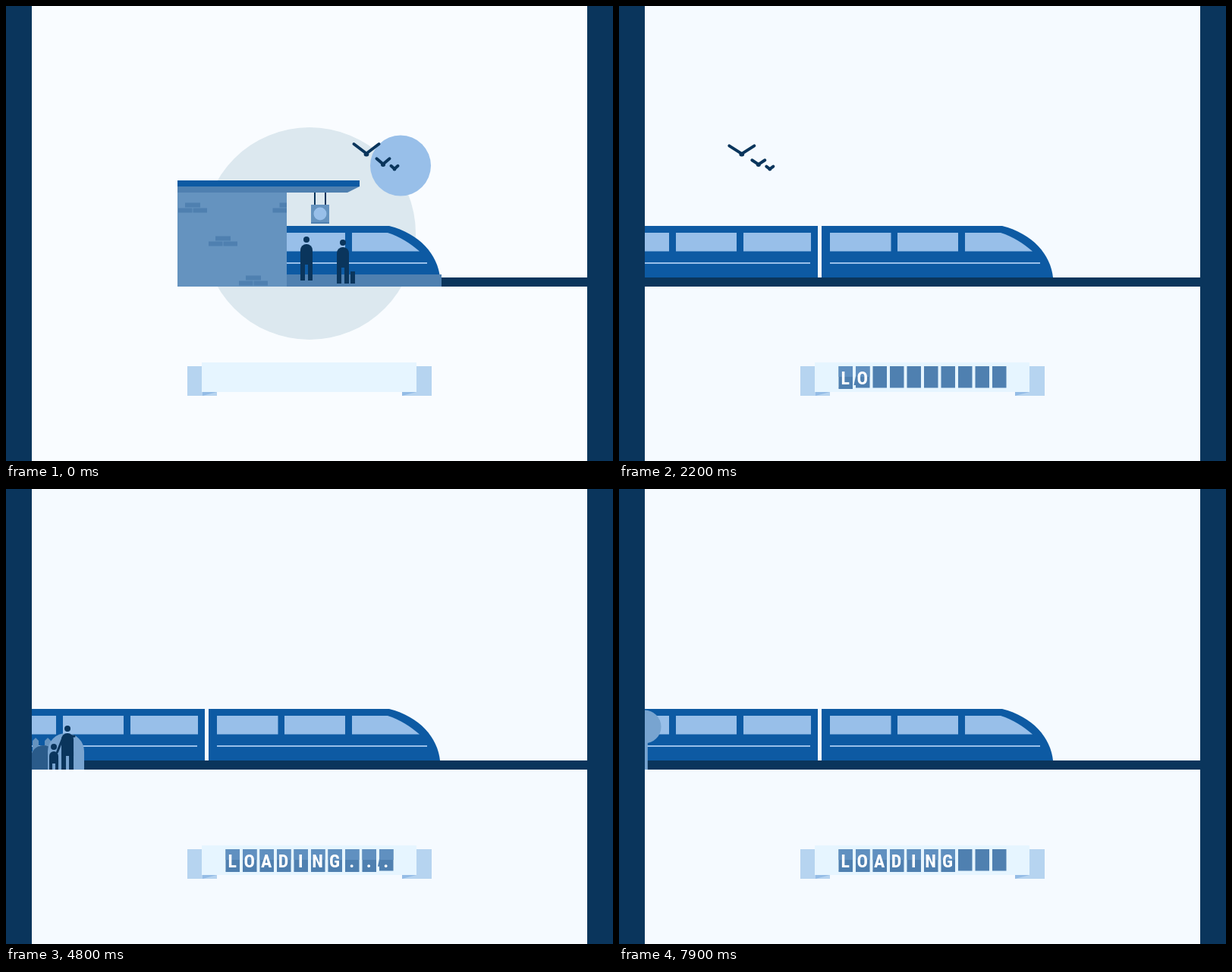
Recreate the animation shown at these times as an HTML page with a canvas. Size 800x600 px, loop 8000 ms.

```html
<!DOCTYPE html>
<html lang="en">
<head>
<meta charset="utf-8">
<title>Train loader</title>
<style>
html, body { margin: 0; width: 100%; height: 100%; overflow: hidden; background: #f9fcff; }
canvas { display: block; }
</style>
</head>
<body>
<canvas id="stage" width="800" height="600"></canvas>
<script>
const ctx = document.getElementById('stage').getContext('2d');
const LOOP = 8, SPEED = 465;
const NAVY = '#0a355c', BODY = '#0d5aa3', GLASS = '#98bfe9', WALL = '#6593bf',
      SLATE = '#4f80b0', BUSH = '#2a5b8a', PALE = '#78a4d0';
const WORD = 'LOADING...';

const clamp = v => Math.max(0, Math.min(1, v));

function rect(x, y, w, h, color) {
  ctx.fillStyle = color;
  ctx.fillRect(x, y, w, h);
}

function disc(x, y, r, color) {
  ctx.fillStyle = color;
  ctx.beginPath();
  ctx.arc(x, y, r, 0, Math.PI * 2);
  ctx.fill();
}

function poly(points, color) {
  ctx.fillStyle = color;
  ctx.beginPath();
  points.forEach(p => ctx.lineTo(p[0], p[1]));
  ctx.fill();
}

// Rectangle with a fully rounded top
function arch(x, y, w, bottom, color) {
  const r = w / 2;
  ctx.fillStyle = color;
  ctx.beginPath();
  ctx.moveTo(x, bottom);
  ctx.lineTo(x, y + r);
  ctx.arc(x + r, y + r, r, Math.PI, 0);
  ctx.lineTo(x + w, bottom);
  ctx.fill();
}

// Distance after a steady speed-up of length ramp, then constant speed
function cruise(t, start, ramp, speed) {
  const u = Math.max(0, t - start);
  return u < ramp ? speed * u * u / (2 * ramp) : speed * (u - ramp / 2);
}

function sky(t) {
  rect(0, 0, 800, 600, '#f9fcff');
  const k = clamp(t / 2.2), f = k * k * (3 - 2 * k);
  const mix = (a, b) => Math.round(a + (b - a) * f);
  const color = `rgb(${mix(220, 245)},${mix(232, 250)},${mix(239, 255)})`;
  disc(400, 300, 140 + 250 * Math.pow(t / 1.1, 1.39), color);
  ctx.globalAlpha = 1 - Math.pow(clamp(t / 1.8), 4);
  disc(520, 210.5, 40, GLASS);
  ctx.globalAlpha = 1;
}

// The train and track are hidden to the left of the station wall
function train(wall) {
  const left = Math.max(0, wall);
  ctx.save();
  ctx.beginPath();
  ctx.rect(left, 0, 800 - left, 600);
  ctx.clip();
  rect(0, 290, 262, 68, BODY);
  ctx.fillStyle = BODY;
  ctx.beginPath();
  ctx.moveTo(267, 290);
  ctx.lineTo(505, 290);
  ctx.bezierCurveTo(545, 300, 569, 328, 572, 358);
  ctx.lineTo(267, 358);
  ctx.fill();
  [[0, 66], [75, 155], [164, 253], [278, 358.5], [367, 447]].forEach(([a, b]) =>
    rect(a, 299, b - a, 24.5, GLASS));
  ctx.beginPath();
  ctx.moveTo(456, 299);
  ctx.lineTo(503, 299);
  ctx.bezierCurveTo(519, 304, 533, 313, 545, 323.5);
  ctx.lineTo(456, 323.5);
  ctx.fill();
  rect(0, 338, 252, 2, GLASS);
  rect(278, 338, 277, 2, GLASS);
  rect(0, 358, 800, 12, NAVY);
  ctx.restore();
}

function bricks(cx, y) {
  rect(cx - 10, y, 20, 6, SLATE);
  rect(cx - 19, y + 7, 18.5, 6, SLATE);
  rect(cx + .5, y + 7, 18.5, 6, SLATE);
}

function traveller(x, y) {
  disc(x, y, 4, NAVY);
  arch(x - 8, y + 6, 16, y + 33, NAVY);
  rect(x - 8, y + 28, 6, 26, NAVY);
  rect(x + 2, y + 28, 6, 26, NAVY);
}

function station(shift) {
  if (shift > 560) return;
  ctx.save();
  ctx.translate(-shift, 0);
  rect(370, 354, 204, 16, SLATE);
  rect(226, 246, 144, 124, WALL);
  ctx.save();
  ctx.beginPath();
  ctx.rect(226, 246, 144, 124);
  ctx.clip();
  bricks(246, 259.5);
  bricks(286, 303.5);
  bricks(326, 355.5);
  bricks(370.5, 259.5);
  ctx.restore();
  poly([[226, 238], [466, 238], [450, 246], [226, 246]], SLATE);
  rect(226, 230, 240, 8, BODY);
  rect(406, 246, 2, 16, NAVY);
  rect(420, 246, 2, 16, NAVY);
  rect(402, 262, 24, 24, WALL);
  rect(402, 285, 24, 2, SLATE);
  disc(414, 274, 8.5, GLASS);
  traveller(396, 308);
  traveller(444, 312);
  rect(454, 350, 6, 16, NAVY);
  ctx.restore();
}

function bird(x, y, span, lift, size, drop) {
  ctx.strokeStyle = NAVY;
  ctx.lineWidth = 4;
  ctx.lineCap = ctx.lineJoin = 'round';
  ctx.beginPath();
  ctx.moveTo(x - span, y + lift);
  ctx.lineTo(x, y);
  ctx.lineTo(x + span, y + lift);
  ctx.stroke();
  ctx.fillStyle = NAVY;
  ctx.beginPath();
  ctx.ellipse(x, y + drop, size * 1.25, size, 0, 0, Math.PI * 2);
  ctx.fill();
}

function flock(x, t, count) {
  const c = Math.cos(t / 2.5 * Math.PI * 2), sink = 1 - c;
  bird(x, 194.5 + sink * 1.6, 16.5, -5.5 - 7 * c, 2.7, 1.2 * c);
  bird(x + 22, 208.5 + sink * 1.2, 8.5, -1.2 - 6 * c, 2.4, c);
  if (count > 2) bird(x + 37, 214.8 + sink * .8, 4.5, -2 - 2 * c, 1.8, c);
}

function fence(x) {
  if (x < -160 || x > 770) return;
  ctx.save();
  ctx.translate(x, 0);
  rect(22, 346, 120, 4, WALL);
  for (let i = 0; i < 8; i++) {
    const px = 22 + i * 16;
    poly([[px, 370], [px, 332], [px + 4, 328], [px + 8, 332], [px + 8, 370]], WALL);
  }
  arch(0, 338, 32, 370, BUSH);
  arch(116, 338, 32, 370, BUSH);
  arch(138, 322, 48, 370, PALE);
  // Parent holding a child's hand
  disc(164, 316, 4, NAVY);
  arch(156, 322, 16, 352, NAVY);
  rect(156, 346, 6, 24, NAVY);
  rect(166, 346, 6, 24, NAVY);
  ctx.strokeStyle = NAVY;
  ctx.lineWidth = 3;
  ctx.lineCap = 'round';
  ctx.beginPath();
  ctx.moveTo(158, 328);
  ctx.lineTo(150.5, 347);
  ctx.moveTo(170, 326);
  ctx.lineTo(173, 326);
  ctx.stroke();
  disc(146, 340, 4, NAVY);
  arch(140, 346, 12, 362, NAVY);
  rect(140, 358, 4, 12, NAVY);
  rect(148, 358, 4, 12, NAVY);
  ctx.restore();
}

function tree(x, y, r, trunk, color) {
  rect(x - trunk / 2, y, trunk, 370 - y, color);
  disc(x, y, r, color);
}

function grove(x) {
  if (x > 800) return;
  tree(x, 314.5, 16.5, 6.5, WALL);
  tree(x + 25, 327.5, 16.5, 6.5, PALE);
  tree(x + 79.5, 296, 22, 9, WALL);
  tree(x + 112.5, 313.5, 22, 8.5, PALE);
}

function ribbon() {
  [239, 522].forEach(x => rect(x, 475, 39, 39, '#b6d4f0'));
  [259, 522].forEach(x => poly([[x, 509], [x + 19, 509], [x, 514]], '#94bce6'));
  rect(258, 470, 283, 39, '#e6f5ff');
}

// Split-flap tile; p is how far the letter has turned into view
function tile(i, p) {
  const x = 289.5 + i * 22.5, w = 18.5;
  rect(x, 475, w, 28.5, SLATE);
  if (p <= 0) return;
  const cut = 475 + 30 * Math.min(1, p * 1.15);
  rect(x, 475, w, Math.min(14, cut - 475), '#6090c0');
  if (p >= 1) rect(x, 503, w, 2, SLATE);
  if (p > .4 && p < .95) {
    const k = clamp((p - .4) / .4);
    poly([[x, 488], [x - 2.5 * k, 488 + 12 * k], [x + 1, 488 + 12 * k], [x + 1, 488]], SLATE);
  }
  ctx.save();
  ctx.beginPath();
  ctx.rect(x, 475, w, cut - 475);
  ctx.clip();
  ctx.fillStyle = '#fff';
  ctx.font = 'bold 24px "Roboto Condensed", Roboto, sans-serif';
  if ('fontStretch' in ctx) ctx.fontStretch = 'condensed';
  ctx.textAlign = 'center';
  ctx.fillText(WORD[i], x + w / 2 - .6, 498.5);
  ctx.restore();
}

function board(t) {
  ribbon();
  const time = t < 5 ? t : t - 4;
  ctx.globalAlpha = clamp(t - .7);
  for (let i = 0; i < WORD.length; i++) tile(i, clamp((time - .33 * i - 1.65) / .25));
  ctx.globalAlpha = 1;
}

function draw(t) {
  sky(t);
  const shift = cruise(t, .435, 1.19, SPEED);
  train(226 - shift);
  station(shift);
  fence(336 - SPEED * (t - 3.9));
  grove(293.5 - SPEED * (t - 7.1));
  if (t < 3) flock(475 - cruise(t, .597, 1.12, 300), t, 3);
  if (t > 4.6) flock(338 - 405 * (t - 6.1), t, 2);
  board(t);
  rect(0, 0, 34, 600, NAVY);
  rect(766, 0, 34, 600, NAVY);
}

const begin = performance.now();
function frame() {
  draw((performance.now() - begin) / 1000 % LOOP);
  requestAnimationFrame(frame);
}
frame();
</script>
</body>
</html>
```
